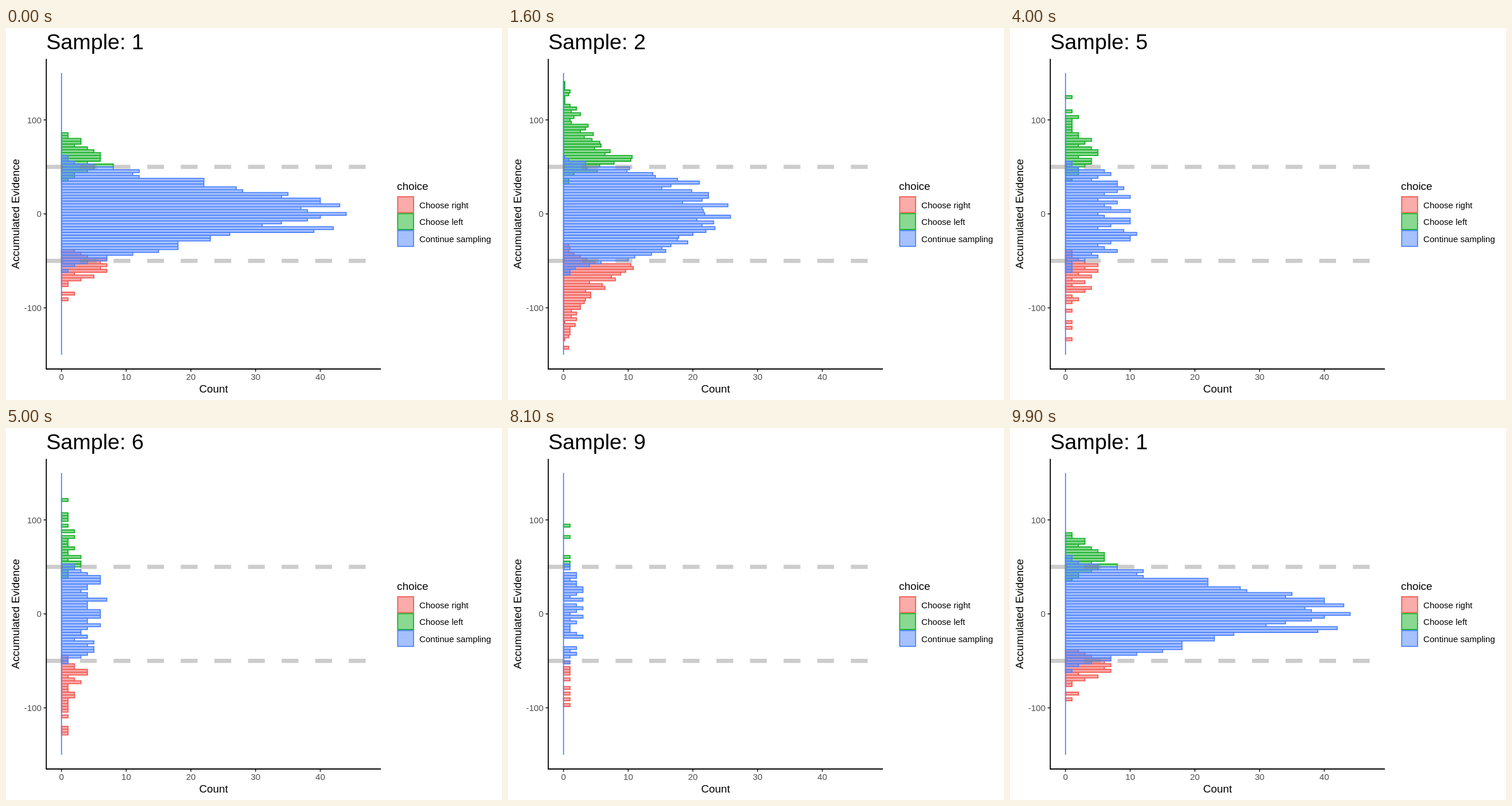
Recreate the animation shown at these times as an HTML page. Size 864 px wide and 648 px high, loop 10 s.

```html
<!DOCTYPE html>
<html lang="en">
<head>
<meta charset="utf-8">
<title>Accumulated evidence by sample</title>
<style>
  html, body { margin: 0; width: 100%; height: 100%; overflow: hidden; background: #fff; }
  svg { display: block; width: 864px; height: 648px; font: 15.08px "Liberation Sans", Arial, sans-serif; }
  .line { stroke: #000; stroke-width: 1.83; fill: none; }
  .tick { stroke: #333; stroke-width: 1.83; }
  .tick-label { fill: #4d4d4d; }
  .heading { font-size: 18.85px; }
  .threshold { stroke: #7f7f7f; stroke-opacity: .4; stroke-width: 7.32; stroke-dasharray: 29.28; }
  .series { stroke-width: 1.83; fill-opacity: .5; }
</style>
</head>
<body>
<svg viewBox="0 0 864 648">
  <text id="title" x="70.2" y="37" font-size="37.7"></text>
  <g id="bars"></g>
  <g id="axes"></g>
  <g id="legend"></g>
</svg>
<script>
const BIN_LIMIT = 49;
const BIN_WIDTH = 300 / 99;
const BINS = Array.from({ length: 2 * BIN_LIMIT + 1 }, (_, i) => i - BIN_LIMIT);

const SAMPLES = 10;
const TRIALS = 1000;
const FIRST_STEP_SD = 30;
const LATER_STEP_SD = 38;
const THRESHOLD = 50;
const THRESHOLD_SOFTNESS = 4;

const FRAME_MS = 100;
const FRAMES = 100;
const TWEEN_FRAMES = 5;
const TWEEN_STARTS = [6, 16, 26, 36, 46, 55, 65, 75, 85, 95];

const SERIES = [
  { key: 'right', label: 'Choose right', color: '#f35b54' },
  { key: 'left', label: 'Choose left', color: '#16b127' },
  { key: 'go', label: 'Continue sampling', color: '#4f83ff' },
];

const xOf = count => 96.7 + 11.27 * count;
const yOf = evidence => 323.8 - 1.637 * evidence;
const byId = id => document.getElementById(id);

function seededRandom(seed) {
  return () => {
    seed = (seed + 0x6D2B79F5) | 0;
    let t = Math.imul(seed ^ (seed >>> 15), 1 | seed);
    t = (t + Math.imul(t ^ (t >>> 7), 61 | t)) ^ t;
    return ((t ^ (t >>> 14)) >>> 0) / 2 ** 32;
  };
}

const gaussian = (x, sd) => Math.exp(-.5 * (x / sd) ** 2) / (sd * Math.sqrt(2 * Math.PI));

// Trials drift by a random step each sample and leave once they pass the soft thresholds.
function simulate() {
  const random = seededRandom(7);
  const scatter = mean => Math.max(0, Math.round(mean + 1.2 * (2 * random() - 1) * Math.sqrt(mean)));
  let active = BINS.map(bin => bin === 0 ? TRIALS : 0);

  return Array.from({ length: SAMPLES }, (_, n) => {
    const sd = n === 0 ? FIRST_STEP_SD : LATER_STEP_SD;
    const moved = BINS.map(bin => BINS.reduce((sum, other, j) =>
      sum + active[j] * BIN_WIDTH * gaussian((bin - other) * BIN_WIDTH, sd), 0));
    active = moved.map((mean, i) =>
      mean / (1 + Math.exp((Math.abs(BINS[i]) * BIN_WIDTH - THRESHOLD) / THRESHOLD_SOFTNESS)));
    const chosen = moved.map((mean, i) => mean - active[i]);
    return {
      right: chosen.map((mean, i) => BINS[i] < 0 ? scatter(mean) : 0),
      left: chosen.map((mean, i) => BINS[i] > 0 ? scatter(mean) : 0),
      go: active.map(scatter),
    };
  });
}

function drawAxes() {
  const thresholds = [THRESHOLD, -THRESHOLD].map(v => `<path class="threshold" d="M70.2 ${yOf(v)}H653"/>`);
  const yTicks = [-100, 0, 100].map(v => `
    <path class="tick" d="M65.5 ${yOf(v)}H70.2"/>
    <text class="tick-label" x="61.8" y="${yOf(v) + 5.4}" text-anchor="end">${v}</text>`);
  const xTicks = [0, 10, 20, 30, 40].map(v => `
    <path class="tick" d="M${xOf(v)} 594V598.7"/>
    <text class="tick-label" x="${xOf(v)}" y="613.2" text-anchor="middle">${v}</text>`);
  byId('axes').innerHTML = [...thresholds, ...yTicks, ...xTicks].join('') + `
    <path class="line" d="M70.2 53.8V594H653"/>
    <text class="heading" x="361.6" y="635" text-anchor="middle">Count</text>
    <text class="heading" transform="translate(22.8 323.8) rotate(-90)" text-anchor="middle">Accumulated Evidence</text>`;
}

function drawLegend() {
  const keys = SERIES.map(({ label, color }, i) => `
    <rect class="series" x="682.3" y="${294 + 29.4 * i}" width="27.6" height="27.6" fill="${color}" stroke="${color}"/>
    <text x="720" y="${313.8 + 29.4 * i}">${label}</text>`);
  byId('legend').innerHTML = `<text class="heading" x="681" y="281.6">choice</text>` + keys.join('');
}

function barsPath(counts) {
  const height = 1.637 * BIN_WIDTH;
  return counts.map((count, i) => {
    if (count === 0) return '';
    const top = yOf((BINS[i] + .5) * BIN_WIDTH);
    return `M${xOf(0)} ${top.toFixed(2)}H${xOf(count).toFixed(2)}v${height.toFixed(2)}H${xOf(0)}z`;
  }).join('');
}

const samples = simulate();
drawAxes();
drawLegend();
byId('bars').innerHTML = SERIES.map(({ key, color }) =>
  `<path id="${key}" class="series" fill="${color}" stroke="${color}"/>`).join('') +
  `<path class="series" stroke="${SERIES[2].color}" d="M${xOf(0)} ${yOf(150)}V${yOf(-150)}"/>`;

function render(frame) {
  const begun = TWEEN_STARTS.filter(start => start <= frame).length;
  const progress = begun ? Math.min(1, (frame - TWEEN_STARTS[begun - 1] + 1) / TWEEN_FRAMES) : 1;
  const to = begun % SAMPLES;
  const from = begun ? begun - 1 : to;
  byId('title').textContent = `Sample: ${(progress < .5 ? from : to) + 1}`;
  for (const { key } of SERIES) {
    const counts = samples[from][key].map((count, i) =>
      count * (1 - progress) + samples[to][key][i] * progress);
    byId(key).setAttribute('d', barsPath(counts));
  }
}

const startTime = performance.now();
let shownFrame = -1;
function tick() {
  const frame = Math.floor((performance.now() - startTime) / FRAME_MS) % FRAMES;
  if (frame !== shownFrame) render(shownFrame = frame);
  requestAnimationFrame(tick);
}
tick();
</script>
</body>
</html>
```
